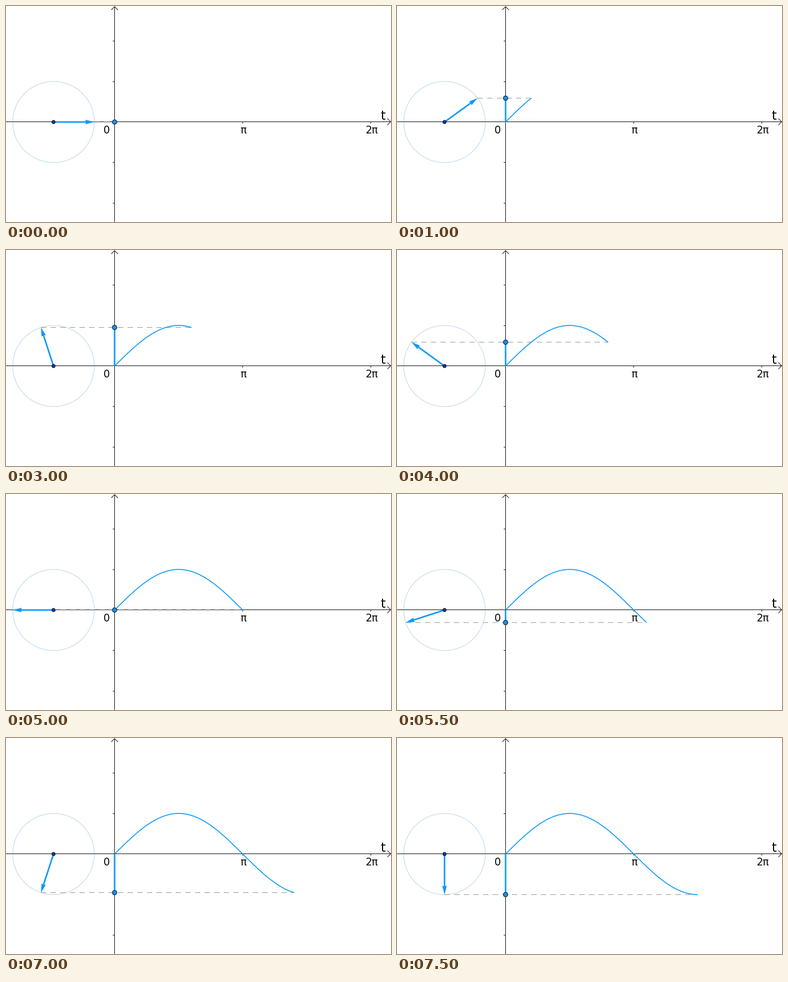
Recreate the animation shown at these times as a matplotlib script. Size 640 by 361 pixels, loop 8 s.

```python
import numpy as np
import matplotlib.pyplot as plt
from matplotlib.animation import FuncAnimation
from matplotlib.patches import Circle, Polygon

W, H, DPI = 640, 361, 100
PX = 72 / DPI  # points per pixel
FRAMES, INTERVAL = 16, 500
STEP = np.pi / 10

UNIT = 67.8
CX, CY = 79.0, 193.9   # centre of the rotating vector
OX = 180.5             # origin of the graph
AXIS_Y = 193.5
HEAD_LEN, HEAD_HALF = 14.5, 3.7

BLUE = "#0c99fb"
INK = "#222222"

fig = plt.figure(figsize=(W / DPI, H / DPI), dpi=DPI, facecolor="white")
ax = fig.add_axes([0, 0, 1, 1])
ax.set_xlim(0, W)
ax.set_ylim(H, 0)
ax.axis("off")


def line(xs, ys, color=INK, width=1.0, z=2, **kw):
    kw.setdefault("solid_capstyle", "butt")
    (item,) = ax.plot(xs, ys, color=color, lw=width * PX, zorder=z, **kw)
    item.set_snap(False)
    return item


def dot(x, y, radius, fill, z):
    item = Circle((x, y), radius, fc=fill, ec="#101828", lw=1.0 * PX, zorder=z)
    return ax.add_patch(item)


def label(x, y, text, size):
    ax.text(x, y, text, fontsize=size * PX, family="DejaVu Sans",
            color="black", ha="left", va="baseline", zorder=3)


# Axes, ticks and labels
line([0, W - 0.5], [AXIS_Y, AXIS_Y])
line([W - 6, W - 0.5, W - 6], [AXIS_Y - 5.5, AXIS_Y, AXIS_Y + 5.5])
line([OX, OX], [1, H])
line([OX - 5.5, OX, OX + 5.5], [6.5, 1, 6.5])
for n in (-2, -1, 1, 2):
    y = np.floor(CY + n * UNIT) + 0.5
    line([OX - 3, OX], [y, y])
for n in (1, 2):
    x = np.floor(OX + n * np.pi * UNIT) + 0.5
    line([x, x], [AXIS_Y, AXIS_Y + 3])
label(162, 213, "0", 17)
label(389, 213, "π", 17)
label(598, 213, "2π", 17)
label(622.5, 190, "t", 21)

ax.add_patch(Circle((CX, CY), UNIT, fill=False, ec="#bfd9ec", lw=PX, zorder=1))

# Moving parts
guide = line([], [], "#9c9c9c", 1.0, 4, ls=(0, (9, 7)), dash_capstyle="butt")
curve = line([], [], BLUE, 1.5, 5)
height = line([], [], BLUE, 2.5, 6)
shaft = line([], [], BLUE, 2.5, 6)
head = ax.add_patch(Polygon([(0, 0)] * 3, closed=True, fc=BLUE, ec="none", zorder=6))
dot(CX, CY, 2.8, "#1535b8", 8)
marker = dot(OX, CY, 3.7, "#1294f6", 8)


def update(frame):
    angle = frame * STEP
    along = np.array([np.cos(angle), -np.sin(angle)])
    across = np.array([-along[1], along[0]])
    center = np.array([CX, CY])
    tip = center + UNIT * along
    base = tip - HEAD_LEN * along

    shaft.set_data([CX, base[0]], [CY, base[1]])
    head.set_xy([tip, base + HEAD_HALF * across, base - HEAD_HALF * across])
    guide.set_data([tip[0], OX + UNIT * angle], [tip[1], tip[1]])
    height.set_data([OX, OX], [CY, tip[1]])
    marker.center = (OX, tip[1])

    t = np.linspace(0, angle, 160)
    curve.set_data(OX + UNIT * t, CY - UNIT * np.sin(t))
    return guide, curve, height, shaft, head, marker


anim = FuncAnimation(fig, update, frames=FRAMES, interval=INTERVAL,
                     repeat=True, repeat_delay=0, blit=False)
plt.show()
```
